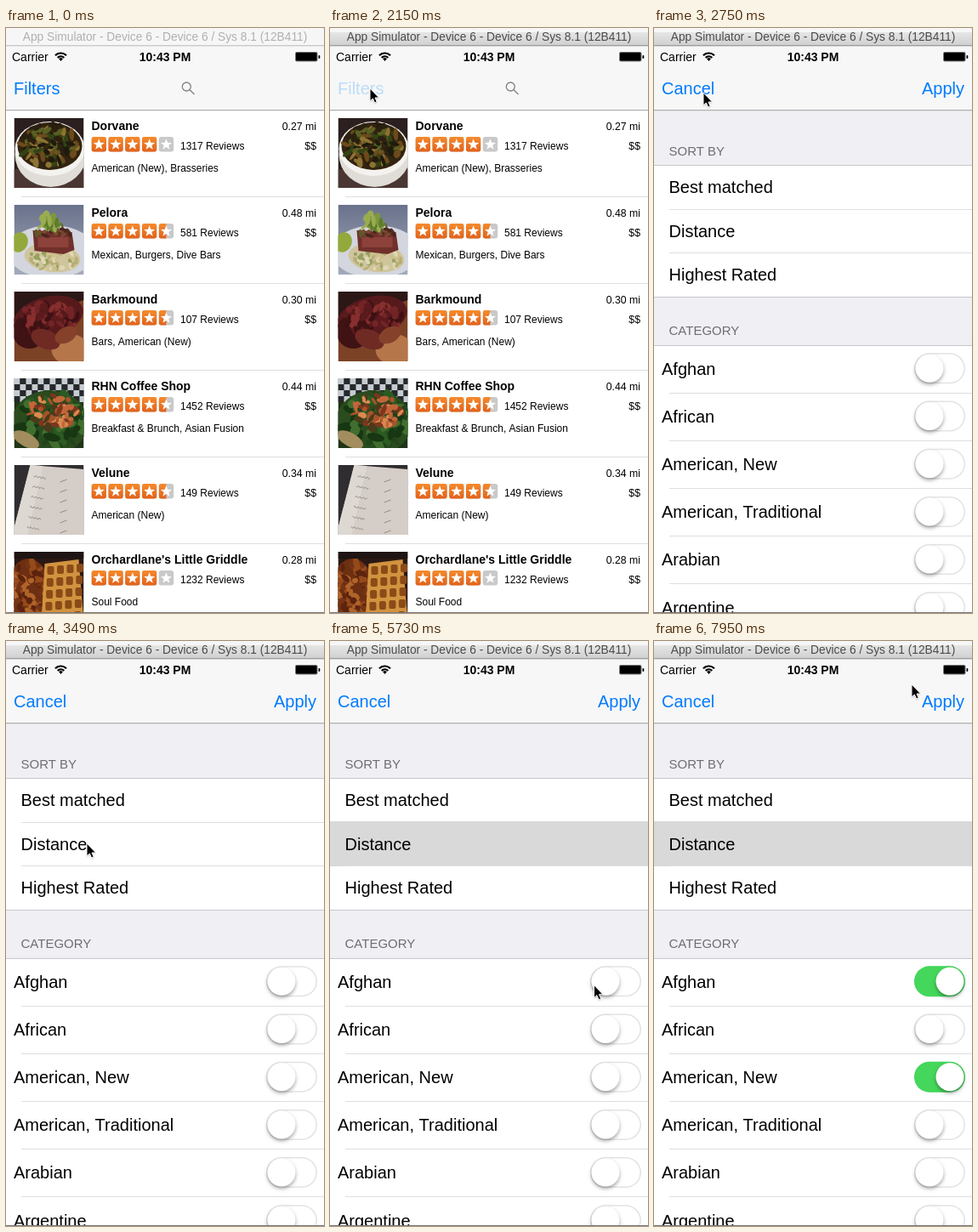
Animation of 374x688 px, one loop 8 s. Source, as an HTML page with a canvas:

```html
<!DOCTYPE html>
<html lang="en">
<head>
<meta charset="utf-8">
<title>Filter sheet</title>
<style>
html, body { margin: 0; width: 100%; height: 100%; overflow: hidden; background: #fff; }
canvas { display: block; width: 374px; height: 688px; }
</style>
</head>
<body>
<canvas id="stage" width="374" height="688"></canvas>
<script>
const ctx = document.getElementById('stage').getContext('2d');
const W = 374, H = 688, LOOP = 8000;
const FONT = '"Liberation Sans", Arial, sans-serif';
const BLUE = '#007aff', LINE = '#c8c7cc', HAIRLINE = '#dfdee2', BAR = '#f7f7f7';

const places = [
  ['Dorvane', 4, '1317', '0.27', 'American (New), Brasseries'],
  ['Pelora', 4.5, '581', '0.48', 'Mexican, Burgers, Dive Bars'],
  ['Barkmound', 4.5, '107', '0.30', 'Bars, American (New)'],
  ['RHN Coffee Shop', 4.5, '1452', '0.44', 'Breakfast & Brunch, Asian Fusion'],
  ['Velune', 4.5, '149', '0.34', 'American (New)'],
  ["Orchardlane's Little Griddle", 4, '1232', '0.28', 'Soul Food'],
];
const sorts = ['Best matched', 'Distance', 'Highest Rated'];
const categories = ['Afghan', 'African', 'American, New', 'American, Traditional', 'Arabian', 'Argentine'];

// Pointer stops: time, x, y
const pointerPath = [
  [500, 69, 56], [650, 60, 60], [800, 46, 66], [950, 42, 69], [1390, 42, 69],
  [1540, 47, 71], [2430, 47, 71], [2580, 52, 73], [2730, 58, 76],
  [3480, 95, 238], [4690, 95, 238], [5860, 320, 412], [6320, 320, 412],
  [6750, 320, 511], [7050, 320, 515], [7200, 320, 515],
  [7500, 300, 300], [7790, 303, 44], [7940, 303, 51],
];

const clamp = v => Math.max(0, Math.min(1, v));
const smooth = v => (v = clamp(v), v * v * (3 - 2 * v));

const sampleTime = t => t < 500 ? 0 : 500 + 149 * Math.floor((t - 500) / 149);

function rect(x, y, w, h, color) {
  ctx.fillStyle = color;
  ctx.fillRect(x, y, w, h);
}

function pill(x, y, w, h, color, r = h / 2) {
  ctx.beginPath();
  ctx.roundRect(x, y, w, h, r);
  ctx.fillStyle = color;
  ctx.fill();
}

function ellipse(x, y, rx, ry, color, turn = 0) {
  ctx.beginPath();
  ctx.ellipse(x, y, rx, ry, turn, 0, 7);
  ctx.fillStyle = color;
  ctx.fill();
}

function poly(points, color) {
  ctx.beginPath();
  for (let i = 0; i < points.length; i += 2) ctx.lineTo(points[i], points[i + 1]);
  ctx.closePath();
  ctx.fillStyle = color;
  ctx.fill();
}

function text(s, x, y, size, color = '#000', align = 'left', weight = '') {
  ctx.font = `${weight} ${size}px ${FONT}`;
  ctx.textAlign = align;
  ctx.fillStyle = color;
  ctx.fillText(s, x, y);
}

function vertical(y0, y1, from, to) {
  const g = ctx.createLinearGradient(0, y0, 0, y1);
  g.addColorStop(0, from);
  g.addColorStop(1, to);
  return g;
}

// Scatters small morsels over an elliptical area.
function morsels(count, cx, cy, rx, ry, size, colors) {
  let seed = count * 77 + cx;
  const rnd = () => (seed = (seed * 16807) % 2147483647) / 2147483647;
  rnd(); rnd();
  for (let i = 0; i < count; i++) {
    const a = rnd() * 6.28, d = Math.sqrt(rnd());
    ellipse(cx + Math.cos(a) * d * rx, cy + Math.sin(a) * d * ry,
      size * (0.5 + rnd()), size * (0.3 + rnd() * 0.5), colors[i % colors.length], rnd() * 3);
  }
}

const photos = [
  () => {
    rect(0, 0, 82, 82, '#2b201f');
    rect(0, 60, 82, 22, '#4a3632');
    ellipse(43, 43, 42, 38, '#e0ddd8');
    ellipse(42, 36, 41, 32, '#f4f2ee');
    ellipse(42, 33, 38, 28, '#33240f');
    morsels(120, 42, 32, 34, 24, 5, ['#6d4a1c', '#334314', '#8d7232', '#1e1a0d', '#5a5f22', '#2b2010']);
  },
  () => {
    rect(0, 0, 82, 82, vertical(0, 82, '#69728b', '#a3abbb'));
    ellipse(44, 55, 52, 31, '#d3d6de');
    ellipse(6, 44, 10, 12, '#93a93b', 0.4);
    ellipse(45, 62, 33, 17, '#cfc59d', 0.12);
    morsels(45, 45, 64, 30, 12, 4, ['#e0d8b5', '#b7ad76', '#98a160', '#cdbf8c']);
    poly([22, 30, 68, 32, 71, 53, 58, 58, 24, 54], '#70302c');
    rect(28, 38, 36, 12, '#8d413b');
    morsels(18, 46, 32, 21, 5, 4, ['#4d251e', '#7a4a30', '#5b5a2a']);
    morsels(30, 42, 19, 13, 9, 5, ['#7d973c', '#5f7c2b', '#9aac50']);
  },
  () => {
    rect(0, 0, 82, 82, '#7c4226');
    poly([0, 0, 82, 0, 82, 10, 0, 36], '#2a1716');
    ellipse(66, 68, 22, 18, '#b5764a');
    ellipse(40, 30, 42, 24, '#561a1c', -0.25);
    ellipse(18, 47, 20, 20, '#3f1214');
    morsels(60, 40, 31, 35, 18, 5, ['#742426', '#3d1013', '#5c1a1c', '#862f2e']);
    ellipse(37, 56, 18, 11, '#6f2a24', 0.4);
    ellipse(61, 51, 14, 9, '#86412b', -0.5);
  },
  () => {
    rect(0, 0, 82, 82, '#1f3517');
    for (let i = 0; i < 48; i++)
      rect(i % 12 * 7, Math.floor(i / 12) * 7, 7, 7, (i + Math.floor(i / 12)) % 2 ? '#26282c' : '#c6cbd2');
    ellipse(42, 52, 45, 38, '#294b1e');
    morsels(55, 42, 50, 41, 31, 8, ['#2c5b22', '#173712', '#406e2e', '#22441a']);
    morsels(60, 44, 40, 30, 20, 5, ['#c2663a', '#d98a50', '#7d351c', '#a9522a', '#4a3a1a']);
    ellipse(14, 72, 17, 8, '#a28d5e', 0.5);
  },
  () => {
    rect(0, 0, 82, 82, '#302d30');
    poly([19, 0, 82, 5, 82, 82, 0, 82, 0, 74], '#d5cdc7');
    poly([19, 0, 34, 1, 16, 82, 0, 82, 0, 74], '#ded8d3');
    ctx.strokeStyle = '#8b8582';
    ctx.lineWidth = 0.9;
    for (let i = 0; i < 6; i++) {
      const x = 23 - i * 1.5, y = 13 + i * 12;
      ctx.beginPath();
      for (let j = 0; j < 12; j++) ctx.lineTo(x + j * 1.3, y + j * 0.25 + Math.sin(j * 2 + i));
      ctx.moveTo(54, y + 7);
      ctx.lineTo(62, y + 4);
      ctx.stroke();
    }
  },
  () => {
    rect(0, 0, 82, 82, '#2a1814');
    ellipse(17, 48, 26, 40, '#6d2f12');
    morsels(80, 17, 48, 23, 36, 5, ['#964a1a', '#5c230e', '#b0642a', '#743414']);
    poly([36, 14, 76, 9, 82, 82, 32, 82], '#d2933f');
    for (let r = 0; r < 5; r++)
      for (let c = 0; c < 4; c++) pill(39 + c * 11.5 - r * 0.7, 17 + r * 14 - c, 8, 10, '#8a4b18', 2);
    rect(0, 0, 82, 8, '#1d1413');
  },
];

function star(x, y, filled) {
  pill(x, y, 17.5, 17.5, '#c9c9c9', 3);
  if (filled) {
    ctx.save();
    ctx.beginPath();
    ctx.rect(x, y, 17.5 * filled, 18);
    ctx.clip();
    pill(x, y, 17.5, 17.5, vertical(y, y + 17, '#f58b2d', '#e2631b'), 3);
    ctx.restore();
  }
  const points = [];
  for (let i = 0; i < 10; i++) {
    const r = i % 2 ? 2.9 : 6.9, a = i * Math.PI / 5 - Math.PI / 2;
    points.push(x + 8.75 + r * Math.cos(a), y + 9.2 + r * Math.sin(a));
  }
  poly(points, '#fff');
}

function drawList(pressed) {
  rect(0, 21, W, H, '#fff');
  rect(0, 21, W, 76, BAR);
  rect(0, 96, W, 1.3, '#b2b2b2');
  text('Filters', 9, 78, 20, pressed ? '#bcdcf8' : BLUE);
  ctx.strokeStyle = '#808085';
  ctx.lineWidth = 1.3;
  ctx.beginPath();
  ctx.arc(212.3, 69, 5, 0, 7);
  ctx.moveTo(216, 72.7);
  ctx.lineTo(221.5, 78);
  ctx.stroke();

  places.forEach(([name, rating, reviews, miles, kinds], i) => {
    const y = 97 + i * 102;
    ctx.save();
    ctx.translate(9.5, y + 9);
    ctx.beginPath();
    ctx.rect(0, 0, 82, 82);
    ctx.clip();
    photos[i]();
    ctx.restore();
    text(name, 100.5, y + 23, 14, '#000', 'left', 'bold');
    for (let s = 0; s < 5; s++) star(100.5 + s * 19.8, y + 31, clamp(rating - s));
    text(reviews + ' Reviews', 205, y + 46, 12);
    text(kinds, 100.5, y + 72, 12);
    text(miles + ' mi', 365, y + 23, 12.3, '#000', 'right');
    text('$$', 365, y + 46, 12.3, '#000', 'right');
    rect(18, y + 101, W, 1, HAIRLINE);
  });
}

// press widens the knob, on slides it across
function drawSwitch(y, press, on) {
  const x = 306, w = 60, h = 36;
  pill(x, y, w, h, '#e3e3e3');
  ctx.globalAlpha = 1 - Math.max(press, on);
  pill(x + 1.5, y + 1.5, w - 3, h - 3, '#fff');
  ctx.globalAlpha = on;
  pill(x, y, w, h, '#44d75b');
  ctx.globalAlpha = 1;
  const knob = 33 + 7 * press * (1 - on);
  ctx.save();
  ctx.shadowColor = 'rgba(0,0,0,.35)';
  ctx.shadowBlur = 4;
  ctx.shadowOffsetY = 2.5;
  pill(x + 1.5 + on * (w - 3 - knob), y + 1.5, knob, 33, '#fff');
  ctx.restore();
}

function drawSheet(t) {
  rect(0, 21, W, H, '#efeff4');
  rect(0, 21, W, 76, BAR);
  rect(0, 96, W, 1.3, '#b2b2b2');
  text('Cancel', 9, 78, 20, BLUE);
  text('Apply', 365, 78, 20, BLUE, 'right');

  text('SORT BY', 17.5, 150, 15, '#6d6d72');
  rect(0, 161, W, 156, LINE);
  rect(0, 162, W, 154, '#fff');
  sorts.forEach((label, i) => {
    const y = 161 + i * 51.7;
    if (i) rect(18, Math.round(y), W, 1, HAIRLINE);
    if (i === 1 && t >= 4300) rect(0, 212, W, 53, '#d9d9d9');
    text(label, 17.5, Math.round(y + 33), 20);
  });

  text('CATEGORY', 17.5, 361, 15, '#6d6d72');
  rect(0, 373, W, H, '#fff');
  rect(0, 373, W, 1, LINE);
  const pressTimes = { 0: 5960, 2: 7000 };
  categories.forEach((label, i) => {
    const y = 373 + i * 56.2;
    if (i) rect(18, Math.round(y - 0.6), W, 1, HAIRLINE);
    text(label, 9, Math.round(y + 34.5), 20);
    const since = i in pressTimes ? t - pressTimes[i] : 0;
    drawSwitch(y + 9.3, smooth(since / 60), smooth((since - 130) / 180));
  });
}

function drawStatus() {
  text('Carrier', 7, 39, 14);
  text('10:43 PM', 187, 39, 14, '#000', 'center', 'bold');
  ctx.strokeStyle = '#000';
  ctx.lineWidth = 2.2;
  for (const r of [5.2, 9]) {
    ctx.beginPath();
    ctx.arc(64.5, 38.5, r, -Math.PI * 0.76, -Math.PI * 0.24);
    ctx.stroke();
  }
  poly([64.5, 39, 62, 36, 64.5, 35, 67, 36], '#000');
  pill(340, 28, 26.5, 11.5, '#777', 2);
  pill(341, 29, 24.5, 9.5, '#000', 1);
  pill(367.5, 32, 1.8, 4, '#000', 0.9);
}

function drawTitle(active) {
  rect(0, 0, W, 21, '#f6f6f6');
  if (active) rect(0, 5, W, 16, vertical(5, 21, '#e6e6e6', '#cfcfcf'));
  rect(0, 20.3, W, 1, active ? '#888' : '#b8b8b8');
  text('App Simulator - Device 6 - Device 6 / Sys 8.1 (12B411)', 187, 15, 13.75,
    active ? '#4b4b4b' : '#b0b0b0', 'center');
}

function drawPointer(t) {
  if (t < 500) return;
  let i = pointerPath.length - 1;
  while (pointerPath[i][0] > t) i--;
  const a = pointerPath[i], b = pointerPath[i + 1] || a;
  const k = a === b ? 0 : smooth((t - a[0]) / (b[0] - a[0]));
  const arrow = [0, 0, 0, 15, 3.4, 12, 5.6, 17, 8.2, 16, 6, 11, 10.6, 11];
  ctx.save();
  ctx.translate(a[1] + (b[1] - a[1]) * k, a[2] + (b[2] - a[2]) * k);
  ctx.shadowColor = 'rgba(0,0,0,.3)';
  ctx.shadowBlur = 2;
  ctx.shadowOffsetY = 1;
  poly(arrow, '#000');
  ctx.shadowColor = 'transparent';
  ctx.strokeStyle = '#fff';
  ctx.lineWidth = 1;
  ctx.stroke();
  ctx.restore();
}

// Critically damped spring from the bottom edge to rest.
function sheetOffset(t) {
  const s = Math.max(0, t - 2145) / 1000 * 18.9;
  return 667 * (1 + s) * Math.exp(-s);
}

function draw(t) {
  const offset = sheetOffset(t);
  if (offset > 0.5) drawList(t >= 1985);
  if (offset < 667) {
    ctx.save();
    ctx.translate(0, offset < 0.5 ? 0 : offset);
    drawSheet(t);
    ctx.restore();
  }
  drawStatus();
  drawTitle(t >= 1390);
  rect(0, 687, W, 1, '#77777a');
  drawPointer(t);
}

const start = performance.now();
function tick() {
  draw(sampleTime((performance.now() - start) % LOOP));
  requestAnimationFrame(tick);
}
tick();
</script>
</body>
</html>
```
